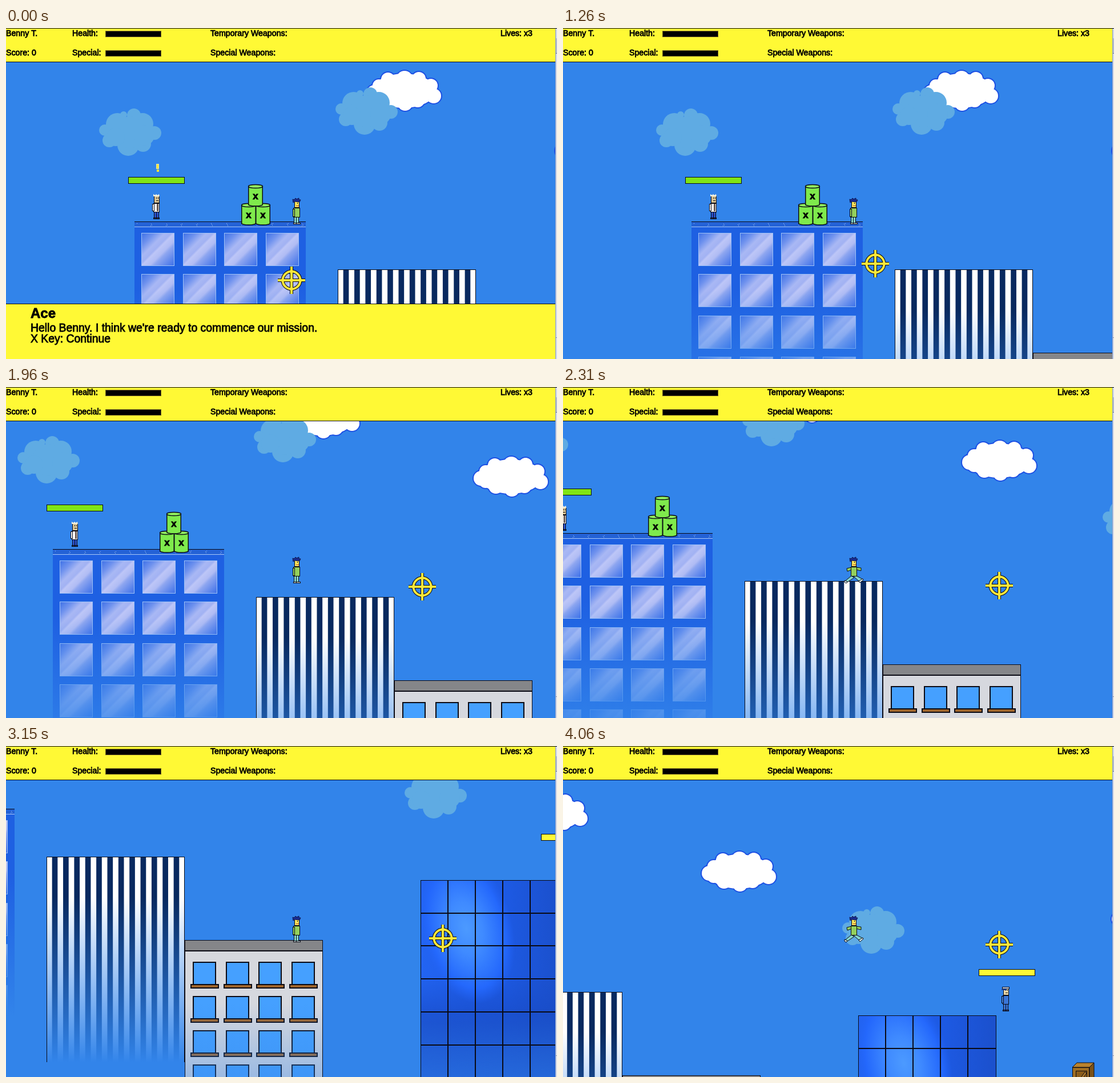
An HTML page with a canvas that plays this animation: 965 px wide and 580 px high, repeating every 4.13 s.

```html
<!DOCTYPE html>
<html>
<head>
<meta charset="utf-8">
<style>
html, body { margin: 0; width: 100%; height: 100%; overflow: hidden; background: #3284ea; }
canvas { display: block; }
</style>
</head>
<body>
<canvas id="stage" width="965" height="580"></canvas>
<script>
const ctx = document.getElementById('stage').getContext('2d');
const SKY = '#3284ea', YELLOW = '#fff935', INK = '#0a0a14';
const STEP = 70, STEPS = 59;

// ---------- helpers ----------
function box(x, y, w, h, fill, line, width = 1) {
  ctx.fillStyle = fill;
  ctx.fillRect(x, y, w, h);
  if (!line) return;
  ctx.strokeStyle = line;
  ctx.lineWidth = width;
  ctx.strokeRect(x + .5, y + .5, w - 1, h - 1);
}
function path(points, fill, line = INK, width = 1) {
  ctx.beginPath();
  points.forEach(([x, y]) => ctx.lineTo(x, y));
  ctx.closePath();
  ctx.fillStyle = fill;
  ctx.fill();
  if (!line) return;
  ctx.strokeStyle = line;
  ctx.lineWidth = width;
  ctx.stroke();
}
function oval(x, y, rx, ry, fill, line, width = 1) {
  ctx.beginPath();
  ctx.ellipse(x, y, rx, ry, 0, 0, 7);
  if (fill) { ctx.fillStyle = fill; ctx.fill(); }
  if (line) { ctx.strokeStyle = line; ctx.lineWidth = width; ctx.stroke(); }
}
function text(str, x, y, size, weight = '') {
  ctx.font = `${weight} ${size}px "Liberation Sans", Arial, sans-serif`;
  ctx.fillStyle = ctx.strokeStyle = '#000';
  ctx.lineWidth = .8;
  ctx.fillText(str, x, y);
  ctx.strokeText(str, x, y);
}
function gradient(x0, y0, x1, y1, stops) {
  const g = ctx.createLinearGradient(x0, y0, x1, y1);
  stops.forEach(([at, color]) => g.addColorStop(at, color));
  return g;
}
// Haze that dissolves a building into the sky
function haze(x, w, from, to, amount = 1) {
  const g = gradient(0, from, 0, to, [[0, 'rgba(50,132,234,0)'], [1, `rgba(50,132,234,${amount})`]]);
  box(x, from, w, 700, g);
}
function tween(keys, n) {
  let i = 1;
  while (i < keys.length - 1 && n > keys[i][0]) i++;
  const [a, va] = keys[i - 1], [b, vb] = keys[i];
  return va + (vb - va) * Math.min(1, Math.max(0, (n - a) / (b - a)));
}

// ---------- motion ----------
const camX = n => tween([[22, 0], [23, 23], [33, 263], [40, 425], [44, 510], [49, 510], [50, 533], [58, 719]], n);
function camY(n) {
  const fall = k => 3.67 * k * (k + 1) / 2;
  if (n <= 23) return 0;
  if (n <= 35) return Math.max(-83, -fall(n - 23));
  if (n <= 49) return Math.max(-229, -83 - fall(n - 35));
  const k = n - 49;
  return -229 + 40.58 * k - 1.583 * k * k;
}
const aimX = n => tween([[16, 500], [22, 641], [23, 641], [30, 764], [40, 764], [50, 766], [58, 764]], n);
const aimY = n => tween([[16, 442], [22, 355], [23, 355], [30, 348], [44, 347], [50, 288], [56, 348]], n);
function striding(n) {
  if (n < 23 || (n > 43 && n < 50)) return false;
  const k = (n < 49 ? n - 23 : n - 49) % 6;
  return k >= 2 && k <= 4;
}

// ---------- scenery ----------
const WHITE_PUFFS = [[-52, 3, 15], [-44, -9, 13], [-28, -20, 14], [1, -21, 16], [26, -21, 14], [47, -9, 14],
  [52, 9, 15], [24, 17, 14], [2, 22, 15], [-26, 17, 15], [-44, 8, 14]];
const PALE_PUFFS = [[7, -30, 12], [-11, -31, 6], [-22, -14, 20], [22, -15, 19], [43, 1, 12], [-44, -4, 10],
  [-3, 22, 19], [-36, 14, 12], [23, 20, 14], [0, 0, 28], [25, 5, 18], [-25, 8, 16]];
function whiteCloud(x, y) {
  for (const [dx, dy, r] of WHITE_PUFFS) oval(x + dx, y + dy, r, r, '#1d50e4');
  oval(x, y, 57, 32, '#1d50e4');
  for (const [dx, dy, r] of WHITE_PUFFS) oval(x + dx, y + dy, r - 2, r - 2, '#fff');
  oval(x, y, 55, 30, '#fff');
}
function paleCloud(x, y) {
  for (const [dx, dy, r] of PALE_PUFFS) oval(x + dx, y + dy, r, r, '#5fabe3');
}

function windowTower(x, y) {
  box(x, y, 300, 600, '#1e60e2');
  box(x, y, 300, 9, '#2462d6');
  box(x, y, 300, 1, INK);
  box(x, y + 9, 300, 1, '#a8c8f8');
  for (let i = 0; i < 34; i++) box(x + 4 + i * 53 % 292, y + 3 + i * 3 % 5, 1, 1, '#9cc0f4');
  for (let row = 0; row < 6; row++) for (let col = 0; col < 4; col++) {
    const wx = Math.round(x + 12 + col * 72.5), wy = Math.round(y + 20 + row * 72.3);
    box(wx, wy, 58, 58, gradient(wx, wy, wx + 58, wy + 58, [[0, '#3c70e6'], [.2, '#6f92ee'], [.36, '#a9b8f4'],
      [.46, '#a2b2f3'], [.5, '#bdc6f7'], [.62, '#b0bcf4'], [.68, '#8ea6f0'], [1, '#3a6ee8']]), '#9fc2f6');
  }
  haze(x, 300, y + 120, y + 365);
}

function stripedTower(x, y) {
  const w = 242 / 25;
  box(x, y, 242, 600, '#fff');
  for (let i = 1; i < 25; i += 2) box(x + i * w, y, w, 600, '#08295f');
  haze(x, 242, y + 70, y + 360);
  box(x, y, 242, 1, INK);
  box(x, y, 1, 360, INK);
  box(x + 241, y, 1, 360, INK);
}

function greyBlock(x, y) {
  box(x, y, 242, 600, '#d6d8de', INK);
  box(x, y, 242, 20, '#858689', INK);
  box(x, y + 18, 242, 2, INK);
  for (let row = 0; row < 5; row++) for (let col = 0; col < 4; col++) {
    const wx = Math.round(x + 14 + col * 57.7), wy = y + 38 + row * 60;
    box(wx, wy, 41, 41, INK);
    box(wx + 2, wy + 2, 37, 38, '#45a0ff');
    box(wx - 4, wy + 39, 50, 8, INK);
    box(wx - 2, wy + 41, 46, 4, '#a0662c');
  }
  haze(x + 1, 240, y + 110, y + 400, .8);
}

function glassTower(x, y) {
  box(x, y, 242, 600, gradient(x, 0, x + 242, 0, [[0, '#2264f2'], [.6, '#1d5ae4'], [1, '#1b50cc']]));
  box(x, y + 174, 242, 420, gradient(0, y + 174, 0, y + 250, [[0, 'rgba(24,74,196,.1)'], [1, 'rgba(24,74,196,.75)']]));
  ctx.save();
  ctx.beginPath();
  ctx.rect(x, y, 242, 600);
  ctx.clip();
  ctx.translate(x + 80, y + 84);
  ctx.rotate(-.25);
  ctx.scale(.6, 1);
  const glow = ctx.createRadialGradient(0, 0, 0, 0, 0, 135);
  [[0, '#4c9aff'], [.35, '#3f8aff'], [.8, '#2468fc'], [1, 'rgba(34,98,244,0)']]
    .forEach(([at, color]) => glow.addColorStop(at, color));
  oval(0, 0, 135, 135, glow);
  ctx.restore();
  haze(x, 242, y + 230, y + 420, .8);
  for (let i = 1; i < 5; i++) box(x + Math.round(i * 48.1) - 1, y, 2, 600, INK);
  for (let i = 1; i < 7; i++) box(x, y + Math.round(i * 57.7) - 1, 242, 2, INK);
  box(x, y, 242, 1, INK);
  box(x, y, 1, 600, INK);
  box(x + 241, y, 1, 600, INK);
}

function paleBlock(x, y) {
  box(x, y, 242, 600, '#c9cdd4', INK);
  box(x, y, 242, 10, '#858689', INK);
  box(x, y + 9, 242, 2, INK);
  for (let row = 0; row < 4; row++) box(x + 14, y + 24 + row * 68, 44, 58, '#aab4c0', '#50565e');
}

function barrel(x, y) {
  box(x, y + 3, 26, 32, '#7fea4c');
  oval(x + 13, y + 35, 12.5, 3, '#7fea4c', INK, 1.5);
  box(x + 1, y + 28, 24, 7, '#7fea4c');
  box(x, y + 3, 1.5, 32, INK);
  box(x + 24.5, y + 3, 1.5, 32, INK);
  oval(x + 13, y + 3.5, 12.5, 3, '#92f060', INK, 1.5);
  ctx.textAlign = 'center';
  text('x', x + 13, y + 26, 17, 'bold');
  ctx.textAlign = 'left';
}

function crate(x, y) {
  path([[x, y + 8], [x + 8, y], [x + 38, y], [x + 30, y + 8]], '#b8822e');
  path([[x + 30, y + 8], [x + 38, y], [x + 38, y + 40], [x + 30, y + 48]], '#7c5216');
  box(x, y + 8, 30, 34, '#a06e22', INK);
  box(x + 6, y + 14, 20, 24, '#8a5c1a', INK);
  path([[x + 8, y + 36], [x + 22, y + 16], [x + 25, y + 18], [x + 11, y + 38]], '#b07a2a');
}

// ---------- people ----------
function person(x, y, look) {
  box(x + 3, y + 2, 10, 14, look.skin, INK);
  box(x + 7, y + 6, 1, 2, INK);
  box(x + 10, y + 6, 1, 2, INK);
  box(x + 7, y + 11, 4, 1, INK);
  box(x + 2, y + 16, 11, 16, look.top, INK);
  box(x, y + 17, 4, 13, look.sleeve, INK);
  if (look.shirt) box(x + 8, y + 17, 3, 13, look.shirt);
  box(x + 3, y + 31, 5, 12, look.legs, INK);
  box(x + 7, y + 31, 5, 12, look.legs, INK);
  box(x + 2, y + 41, 6, 3, look.shoes, INK);
  box(x + 7, y + 41, 6, 3, look.shoes, INK);
}
function blondMan(x, y) {
  person(x, y, { skin: '#d8c494', top: '#fff', sleeve: '#f4f4f4', shirt: '#6a5a50', legs: '#2a50c8', shoes: '#20305c' });
  path([[x + 2, y + 4], [x + 2, y], [x + 5, y + 2], [x + 7, y], [x + 9, y + 2], [x + 12, y], [x + 13, y + 4]], '#f4f2e0', null);
}
function officer(x, y) {
  person(x, y, { skin: '#ecd8a8', top: '#3a76d8', sleeve: '#4280dc', legs: '#3a74d4', shoes: '#28488c' });
  box(x + 1, y + 1, 13, 4, '#c8d4ec', INK);
  box(x, y + 5, 9, 2, '#24489c');
}
function hero(x, y, stride) {
  const skin = '#f8e45c', green = '#94d05c', teal = '#84d4cc';
  if (stride) {
    path([[x + 3, y + 18], [x - 5, y + 20], [x - 4, y + 25], [x + 4, y + 22]], green);
    path([[x + 11, y + 18], [x + 20, y + 19], [x + 20, y + 24], [x + 11, y + 22]], green);
    path([[x + 3, y + 33], [x + 8, y + 36], [x - 4, y + 44], [x - 8, y + 42]], teal);
    path([[x + 6, y + 33], [x + 12, y + 33], [x + 23, y + 39], [x + 16, y + 42]], teal);
    path([[x - 9, y + 41], [x - 4, y + 43], [x - 6, y + 46], [x - 9, y + 44]], '#e4f4f4');
    path([[x + 16, y + 42], [x + 23, y + 38], [x + 24, y + 40], [x + 18, y + 45]], '#e4f4f4');
    box(x + 2, y + 17, 11, 17, green, INK);
  } else {
    box(x + 2, y + 33, 9, 12, teal, INK);
    box(x + 6, y + 34, 1, 10, INK);
    box(x + 1, y + 43, 7, 3, '#e4f4f4', INK);
    box(x + 6, y + 43, 8, 3, '#e4f4f4', INK);
    box(x + 1, y + 17, 12, 17, green, INK);
    box(x, y + 19, 4, 14, green, INK);
  }
  box(x + 3, y + 5, 9, 12, skin, INK);
  box(x + 8, y + 8, 1, 2, INK);
  box(x + 6, y + 13, 5, 1, '#c04830');
  path([[x + 1, y + 8], [x, y + 2], [x + 3, y + 3], [x + 5, y], [x + 7, y + 2], [x + 11, y], [x + 11, y + 3],
    [x + 14, y + 3], [x + 12, y + 7], [x + 4, y + 6]], '#1a2c90', '#0c1650');
}

// ---------- overlay ----------
function crosshair(x, y) {
  const layer = (color, w) => {
    oval(x, y, 15.5, 15.5, null, color, w);
    box(x - 24, y - w / 2, 48, w, color);
    box(x - w / 2, y - 24, w, 48, color);
  };
  layer(INK, 6);
  layer('#fbe83a', 4);
}
function hud() {
  box(0, 0, 963, 60, YELLOW);
  box(0, 0, 965, 1, INK);
  box(0, 59, 963, 1, INK);
  [['Benny T.', 0, 14], ['Score: 0', 0, 48], ['Health:', 116, 14], ['Special:', 116, 48],
    ['Temporary Weapons:', 358, 14], ['Special Weapons:', 358, 48], ['Lives: x3', 866, 14]]
    .forEach(([str, x, y]) => text(str, x, y, 14.2));
  box(174, 5, 98, 11, '#000', '#6a5a20');
  box(174, 39, 98, 11, '#000', '#6a5a20');
}
function dialog() {
  box(0, 483, 963, 97, YELLOW);
  box(0, 483, 963, 1, INK);
  text('Ace', 43, 508, 24, 'bold');
  text("Hello Benny. I think we're ready to commence our mission.", 43, 532, 19.4);
  text('X Key: Continue', 43, 551, 19.4);
}
function windowEdge() {
  box(962, 1, 3, 579, '#d6dcea');
  box(962, 1, 1, 579, '#8a9cc4');
  box(963, 18, 2, 26, '#b4bccc');
  box(963, 44, 2, 1, '#6c7890');
  box(963, 542, 2, 1, '#8a94a8');
}

function draw(n) {
  const talking = n < 10;
  box(0, 0, 965, 580, SKY);
  ctx.save();
  ctx.translate(-Math.round(camX(n)), Math.round(camY(n)));
  whiteCloud(697, 110);
  whiteCloud(1027, 212);
  whiteCloud(1745, 292);
  paleCloud(217, 183);
  paleCloud(631, 146);
  paleCloud(1262, 315);
  windowTower(225, 339);
  stripedTower(581, 423);
  greyBlock(823, 569);
  paleBlock(1478, 608);
  glassTower(1236, 464);
  barrel(412, 307);
  barrel(437, 307);
  barrel(424, 274);
  crate(1611, 547);
  blondMan(256, 291);
  box(214, 261, 99, 12, '#80e414', INK);
  if (talking) {
    box(263, 238, 5, 9, '#fbe83a', '#e8e4a0');
    box(264, 248, 4, 4, '#fbe83a');
  }
  officer(1487, 413);
  box(1447, 383, 99, 12, YELLOW, INK);
  ctx.restore();
  hero(502, 298, striding(n));
  crosshair(Math.round(aimX(n)), Math.round(aimY(n)));
  hud();
  if (talking) dialog();
  windowEdge();
}

const start = performance.now();
function tick() {
  draw(Math.floor((performance.now() - start) / STEP) % STEPS);
  requestAnimationFrame(tick);
}
tick();
</script>
</body>
</html>
```
